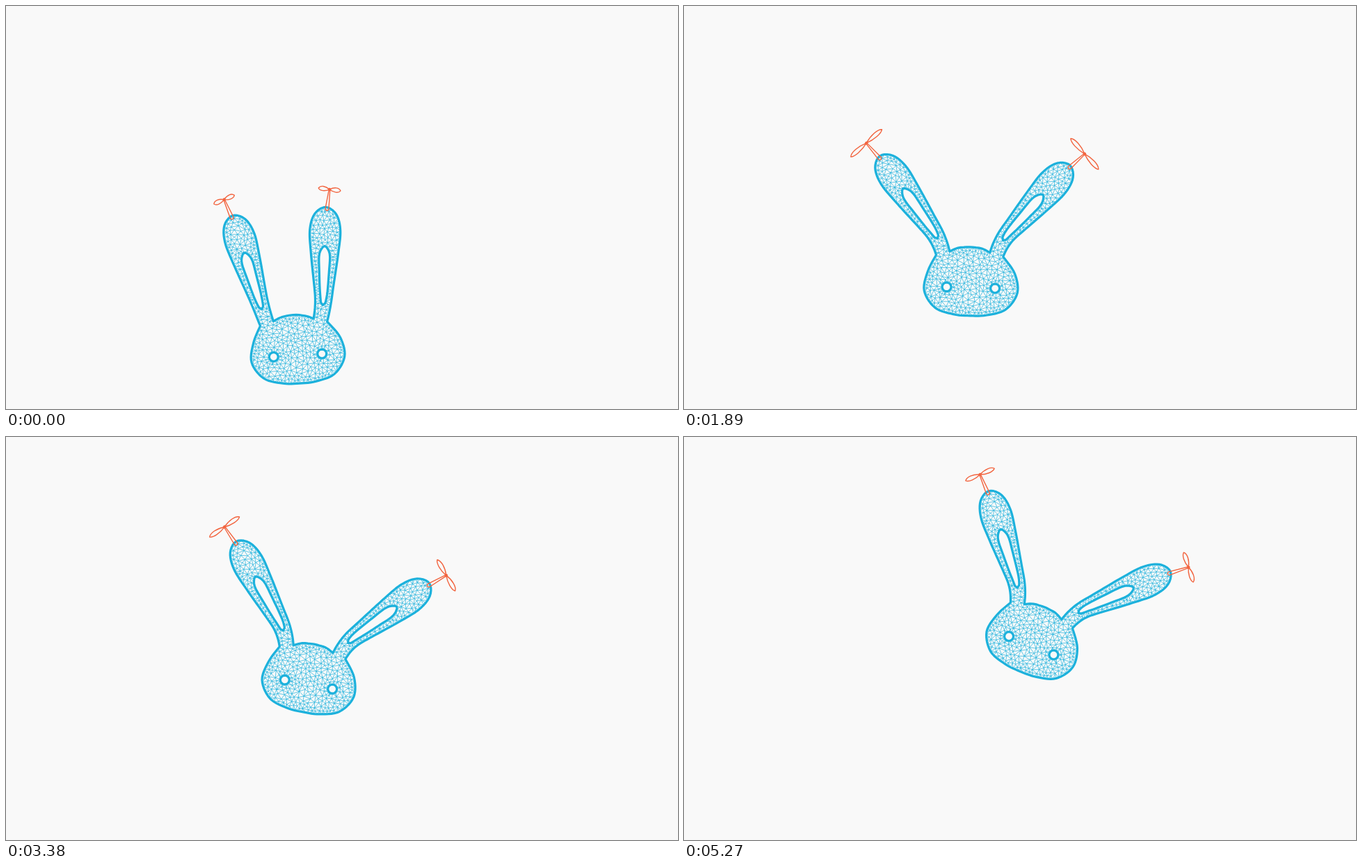
An HTML page with a canvas that plays this animation: 966 px wide and 580 px high, repeating every 5.42 s.

```html
<!DOCTYPE html>
<html lang="en">
<head>
<meta charset="utf-8">
<title>Flying rabbit mesh</title>
<style>
html, body { margin: 0; width: 100%; height: 100%; overflow: hidden; background: #f9f9f9; }
canvas { display: block; }
</style>
</head>
<body>
<canvas id="stage" width="966" height="580"></canvas>
<script>
const ctx = document.getElementById('stage').getContext('2d');
const BLUE = '#1cb1dc', RED = '#f2643f', RAD = Math.PI / 180;
const LOOP = 5420, LAST = 67, STEP = 5270 / LAST;
const TILT = 16 * RAD, BEND_LENGTH = 40;
const SIDES = [-1, 1];

// Half outlines, mirrored below. Ears: [along, across]; face: [x, y] from between the eyes
const EAR = [[0, 10], [36, 12.3], [96, 19.6], [130, 22], [153, 15.5]];
const HOLE = [[25, 3], [42, 5.4], [70, 7], [92, 7.8], [102, 5]];
const FACE = [[62.5, -22], [67, 6], [51, 30], [24, 39]];

let seed = 7;
const random = () => (seed = seed * 16807 % 2147483647) / 2147483647;
const dist = (a, b) => Math.hypot(a[0] - b[0], a[1] - b[1]);
const rotate = ([x, y], a) =>
  [x * Math.cos(a) - y * Math.sin(a), x * Math.sin(a) + y * Math.cos(a)];
const edgeKey = (a, b) => Math.min(a, b) + '-' + Math.max(a, b);

const earBase = side => [side * 38.6 - 3, -48.5];

// Ear coordinates (along its axis, outward across it) to head coordinates and back
function fromEar([along, across], side) {
  const [x, y] = rotate([across, -along], TILT), base = earBase(side);
  return [base[0] + side * x, base[1] + y];
}
function toEar(p, side) {
  const base = earBase(side);
  const [x, y] = rotate([side * (p[0] - base[0]), p[1] - base[1]], -TILT);
  return [-y, x];
}

// Smooth curve through points, resampled about every 4 px, without its last point
function curve(pts, closed) {
  const n = pts.length, out = [];
  const at = i => closed ? pts[(i + n) % n] : pts[Math.max(0, Math.min(n - 1, i))];
  for (let i = 0; i < (closed ? n : n - 1); i++) {
    const [p, a, b, q] = [-1, 0, 1, 2].map(k => at(i + k));
    const parts = Math.max(1, Math.round(dist(a, b) / 4));
    for (let k = 0; k < parts; k++) {
      const u = k / parts;
      out.push([0, 1].map(d => a[d] + u / 2 * (b[d] - p[d] +
        u * (2 * p[d] - 5 * a[d] + 4 * b[d] - q[d] +
        u * (3 * a[d] - p[d] - 3 * b[d] + q[d])))));
    }
  }
  return out;
}

const flip = pts => pts.map(([a, b]) => [a, -b]).reverse();
const earPoints = side => {
  const pts = [...EAR, [163, 0], ...flip(EAR)].map(p => fromEar(p, side));
  return side < 0 ? pts : pts.reverse();
};
const hole = side =>
  curve([[22, 0], ...HOLE, [107, 0], ...flip(HOLE)].map(p => fromEar(p, side)), true);
const eye = side => Array.from({ length: 14 }, (_, i) =>
  [side * 34.8 + 6.5 * Math.cos(i * Math.PI / 7), 6.5 * Math.sin(i * Math.PI / 7)]);

function body() {
  const [left, right] = SIDES.map(earPoints);
  const crown = [left.at(-1), [-20, -56.3], [-3, -58.5], [14, -56.3], right[0]];
  const face = [right.at(-1), ...FACE, [0, 40.5],
    ...FACE.map(([x, y]) => [-x, y]).reverse(), left[0]];
  return [left, crown, right, face].flatMap(part => curve(part));
}
const loops = [body(), ...SIDES.map(hole), ...SIDES.map(eye)];

function trace(path, pts) {
  pts.forEach((p, i) => i ? path.lineTo(...p) : path.moveTo(...p));
  path.closePath();
}

// Delaunay triangulation by point insertion
function triangulate(pts) {
  const n = pts.length, all = [...pts, [-5000, -5000], [6000, -5000], [500, 9000]];
  const make = (a, b, c) => {
    const [ax, ay] = all[a], bx = all[b][0] - ax, by = all[b][1] - ay;
    const cx = all[c][0] - ax, cy = all[c][1] - ay, d = 2 * (bx * cy - by * cx);
    const bb = bx * bx + by * by, cc = cx * cx + cy * cy;
    const x = (cy * bb - by * cc) / d, y = (bx * cc - cx * bb) / d;
    return { v: [a, b, c], x: ax + x, y: ay + y, r: x * x + y * y };
  };
  let tris = [make(n, n + 1, n + 2)];
  pts.forEach(([x, y], i) => {
    const rim = new Map(), keep = [];
    for (const t of tris) {
      if ((x - t.x) ** 2 + (y - t.y) ** 2 >= t.r) { keep.push(t); continue; }
      t.v.forEach((a, k) => {
        const b = t.v[(k + 1) % 3], key = edgeKey(a, b);
        rim.has(key) ? rim.delete(key) : rim.set(key, [a, b]);
      });
    }
    tris = keep;
    for (const [a, b] of rim.values()) tris.push(make(a, b, i));
  });
  return tris.map(t => t.v).filter(v => v.every(i => i < n));
}

// Fill the body with scattered points, finer near the outline, and collect mesh edges
function buildMesh() {
  const shape = new Path2D();
  loops.forEach(l => trace(shape, l));
  const inside = p => ctx.isPointInPath(shape, ...p, 'evenodd');
  const rim = loops.flat().map(p => p.map(c => c + (random() - .5) * .02));
  const verts = [...rim];
  for (let i = 0; i < 40000; i++) {
    const p = [-115 + 225 * random(), -215 + 260 * random()];
    if (!inside(p)) continue;
    const edge = Math.min(...rim.map(q => dist(p, q)));
    const gap = Math.min(5.3, 3.5 + edge * .13);
    if (edge > 3.3 && verts.every(q => dist(p, q) > gap)) verts.push(p);
  }
  const edges = new Map();
  for (const v of triangulate(verts)) {
    const mid = [0, 1].map(d => v.reduce((sum, i) => sum + verts[i][d] / 3, 0));
    if (!inside(mid)) continue;
    v.forEach((a, k) => edges.set(edgeKey(a, v[(k + 1) % 3]), [a, v[(k + 1) % 3]]));
  }
  return { verts, edges: [...edges.values()] };
}
const mesh = buildMesh();

// The ears spread, the climb slows to a steady pace, then the head leans and drifts right
function poseAt(n) {
  const spread = 1 - Math.exp(-n / 10);
  return {
    x: 410.3 + .0346 * (n - 16.3) ** 2,
    y: 502.75 - 2.3 * n - 48.5 * Math.tanh(n / 18),
    turn: (-3.7 + 1.45 * Math.log(1 + Math.exp((n - 13) / 3))) * RAD,
    bend: { '-1': (-2.5 + 26 * spread) * RAD, 1: (-11 + 39 * spread) * RAD },
    grow: 1 + .03 * spread,
    spin: (62 + 56.22 * n) * RAD
  };
}

// Ears follow a circular arc near the base and stay straight beyond it
function bendEar([along, across], bend, grow) {
  const s = along * grow, arc = Math.min(s, BEND_LENGTH);
  const angle = bend * arc / BEND_LENGTH, chord = arc * Math.sin(angle / 2) / (angle / 2 || 1);
  const reach = Math.abs(angle) < 1e-6 ? arc : chord, rest = s - arc;
  return [
    reach * Math.cos(angle / 2) + rest * Math.cos(angle) - across * Math.sin(angle),
    reach * Math.sin(angle / 2) + rest * Math.sin(angle) + across * Math.cos(angle)
  ];
}

function warp(p, pose) {
  const side = p[0] < -3 ? -1 : 1, local = toEar(p, side);
  const onEar = local[0] > 0 && Math.abs(local[1]) < 28;
  const bent = onEar ? fromEar(bendEar(local, pose.bend[side], pose.grow), side) : p;
  const [x, y] = rotate(bent, pose.turn);
  return [x + pose.x, y + pose.y];
}

function drawPropeller(side, pose) {
  const [x, y] = warp(fromEar([188.5, 5], side), pose);
  const [fx, fy] = warp(fromEar([160, 2], side), pose);
  const len = Math.hypot(x - fx, y - fy), reach = 34 * Math.cos(pose.spin);
  ctx.save();
  ctx.translate(x, y);
  ctx.rotate(Math.atan2(x - fx, fy - y));
  ctx.beginPath();
  ctx.moveTo(-.8, 1);
  ctx.lineTo(-2.5, len);
  ctx.quadraticCurveTo(0, len + 4, 2.5, len);
  ctx.lineTo(.8, 1);
  for (const r of [reach, -reach]) {
    ctx.moveTo(0, 0);
    ctx.bezierCurveTo(r * .4, -4.5, r * .85, -4.5, r, 0);
    ctx.bezierCurveTo(r * .85, 3.8, r * .4, 3.8, 0, 0);
  }
  ctx.moveTo(1.6, 0);
  ctx.arc(0, 0, 1.6, 0, 7);
  ctx.stroke();
  ctx.restore();
}

function draw(n) {
  const pose = poseAt(n);
  ctx.fillStyle = '#f9f9f9';
  ctx.fillRect(0, 0, 966, 580);
  ctx.lineJoin = 'round';

  const verts = mesh.verts.map(p => warp(p, pose));
  ctx.strokeStyle = BLUE;
  ctx.lineWidth = .7;
  ctx.beginPath();
  for (const [a, b] of mesh.edges) {
    ctx.moveTo(...verts[a]);
    ctx.lineTo(...verts[b]);
  }
  ctx.stroke();

  ctx.lineWidth = 3.2;
  ctx.beginPath();
  loops.forEach(l => trace(ctx, l.map(p => warp(p, pose))));
  ctx.stroke();

  ctx.strokeStyle = RED;
  ctx.lineWidth = 1.4;
  SIDES.forEach(side => drawPropeller(side, pose));
}

const start = performance.now();
function tick() {
  const t = (performance.now() - start) % LOOP;
  draw(Math.min(LAST, Math.floor((t + 4) / STEP)));
  requestAnimationFrame(tick);
}
tick();
</script>
</body>
</html>
```
